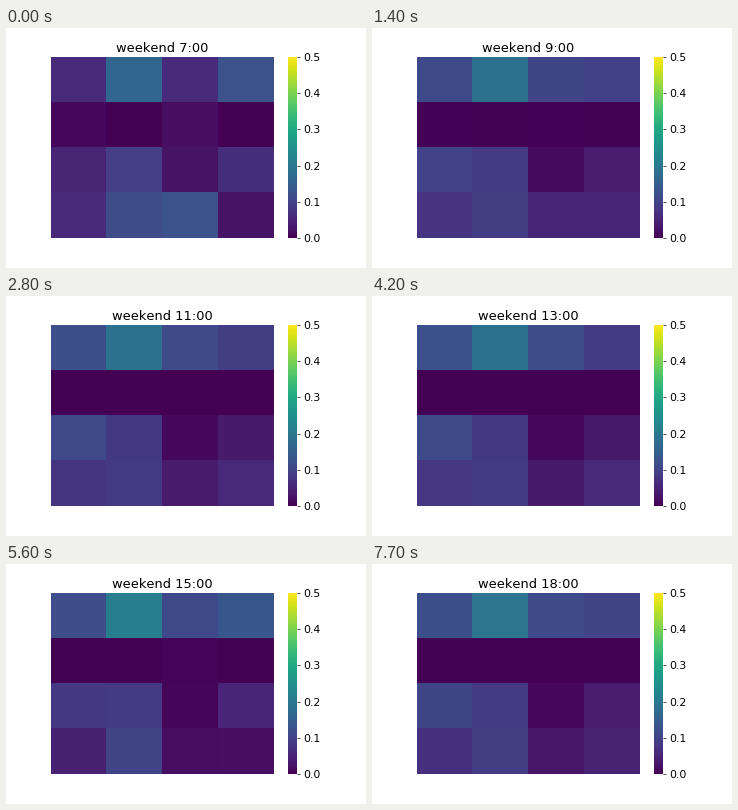
Recreate the animation shown at these times as a matplotlib script. Size 360 by 240 pixels, loop 8 s.

```python
import matplotlib.pyplot as plt
import numpy as np
from matplotlib.animation import FuncAnimation
from matplotlib.transforms import Affine2D

plt.rcParams.update({
    "font.family": "DejaVu Sans",
    "font.size": 13,
    "text.kerning_factor": 6,
    "figure.subplot.left": 0.125,
    "figure.subplot.right": 0.9,
    "figure.subplot.bottom": 0.125,
    "figure.subplot.top": 0.88,
})

FIRST_HOUR = 7
STEP_MS, HOUR_MS, LOOP_MS = 100, 700, 8000

# Midday level of each cell, and how far it moves from that level
# at the start of the day and in the afternoon, in thousandths.
MIDDAY = np.array([[122, 187, 114, 87], [0, 0, 0, 0],
                   [110, 81, 10, 33], [79, 83, 33, 60]])
MORNING = np.array([[-62, -22, -54, 38], [10, 0, 18, 0],
                    [-60, 9, 15, 32], [-22, 32, 92, -35]])
AFTERNOON = np.array([[-4, 26, -6, 47], [0, 0, 4, 0],
                      [-28, 4, -4, 19], [-33, 18, -16, -42]])


def levels(hour):
    """The morning shift fades by the hour; the afternoon one peaks, then ebbs."""
    early = 0.45 ** (hour - FIRST_HOUR)
    late = 0 if hour < 15 else 1 if hour < 17 else 0.3
    return (MIDDAY + early * MORNING + late * AFTERNOON) / 1000


fig, ax = plt.subplots(figsize=(6, 4), dpi=60)
mesh = ax.pcolormesh(levels(FIRST_HOUR), cmap="viridis", vmin=0, vmax=0.5)
ax.invert_yaxis()
ax.axis("off")
title = ax.set_title("")
bar = fig.colorbar(mesh, ax=ax, ticks=np.arange(6) / 10)
bar.outline.set_visible(False)
# Nudge so that cell edges round down to whole pixels.
mesh.set_transform(ax.transData + Affine2D().translate(-0.4, 0.25))


def draw(i):
    hour = FIRST_HOUR + i * STEP_MS // HOUR_MS
    mesh.set_array(levels(hour))
    title.set_text(f"weekend {hour}:00")
    return mesh, title


anim = FuncAnimation(fig, draw, frames=LOOP_MS // STEP_MS, interval=STEP_MS,
                     repeat=True, repeat_delay=0)
plt.show()
```
